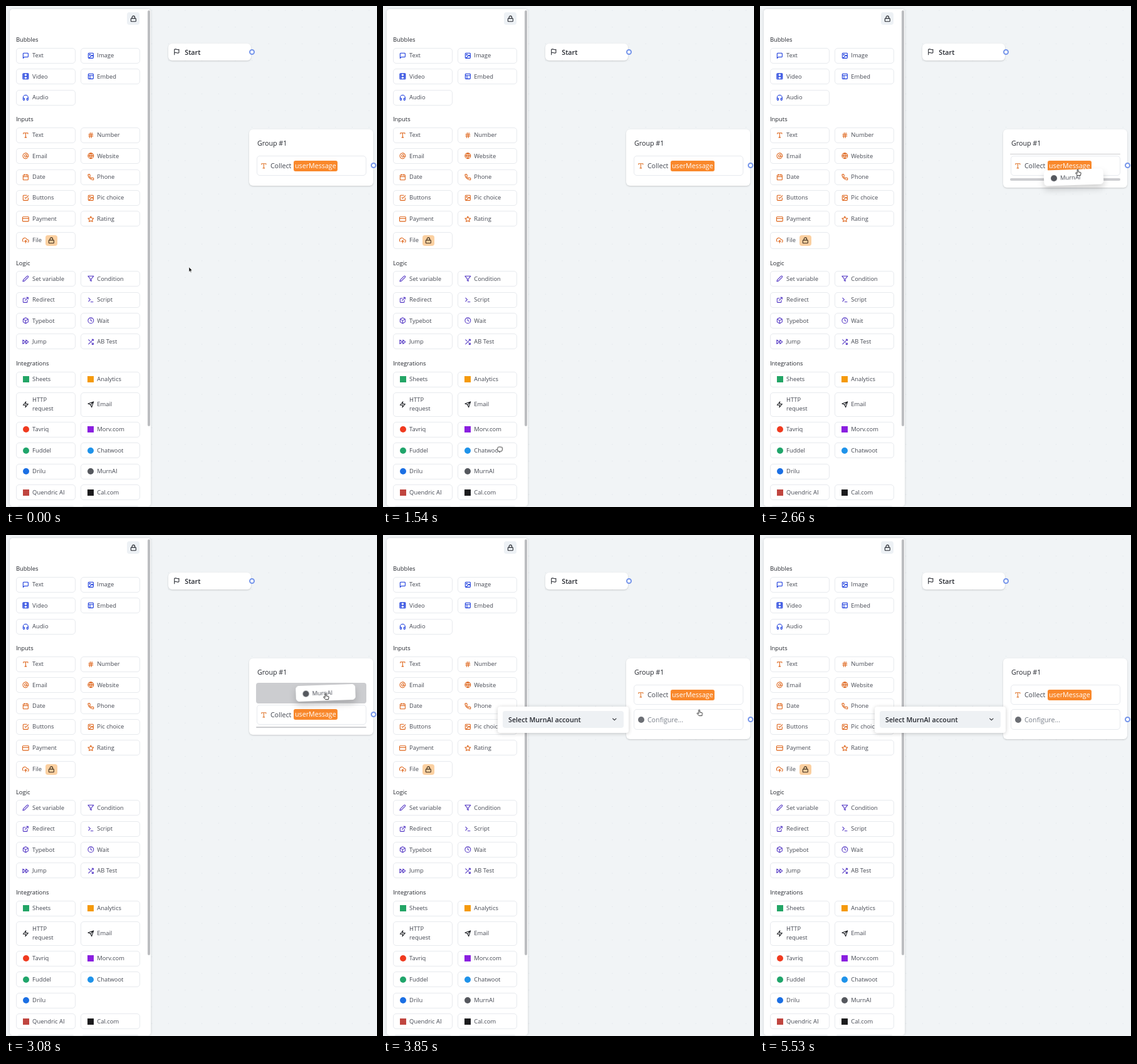
Recreate the animation shown at these times as an HTML page. Size 592 px wide and 800 px high, loop 5.88 s.

```html
<!DOCTYPE html>
<html lang="en">
<head>
<meta charset="utf-8">
<title>Flow editor</title>
<style>
* { box-sizing: border-box; }
html, body { margin: 0; width: 100%; height: 100%; overflow: hidden; }
body {
  position: relative;
  background: radial-gradient(#dde2e8 .7px, transparent 1px) 246px 47px / 26.67px 26.67px #f1f4f6;
  font: 9.4px/14px "Open Sans", sans-serif;
  color: #444852;
}
svg { display: block; width: 10.7px; height: 10.7px; flex: none; overflow: visible;
  fill: none; stroke: currentColor; stroke-width: 2.4; stroke-linecap: round; stroke-linejoin: round; }
.abs, .side, .card, .ghost, .pop, .cursor, .section, .port { position: absolute; }

.side { left: 6px; top: 5px; width: 225px; height: 794px; border-radius: 5px; background: #fff;
  overflow: hidden; }
.shade { left: 6px; top: 5px; width: 225px; height: 794px; border-radius: 5px; box-shadow: 0 0 4px #0002; }
.bar { left: 219.5px; top: 2px; width: 4.2px; height: 664px; border-radius: 2px; background: #bcbdc0; }
.lock { left: 187px; top: 5.3px; width: 20px; height: 20px; border-radius: 4px; background: #edf1f5;
  display: grid; place-items: center; color: #23262d; }
.section { left: 10px; }
.section h2 { height: 6px; margin: 0 0 13.5px; font: 500 9.4px/14px "Open Sans", sans-serif; color: #24272e; }
.grid { display: grid; grid-template-columns: 94.5px 94.5px; gap: 8.4px 8.7px; }
.btn { display: flex; align-items: center; gap: 5px; min-height: 25px; padding: 0 9.4px;
  border: 1px solid #e7eaee; border-radius: 5px; background: #fff; }
.btn.tall { min-height: 38.4px; padding-right: 20px; }
.btn.file { min-height: 27px; }
.badge { width: 19px; height: 17px; margin-left: 1px; border-radius: 4px; background: #fbd0a1; color: #3a2c1c;
  display: grid; place-items: center; }
.dot, .sq { flex: none; width: 10px; height: 10px; margin: 0 .35px; border-radius: 50%; }
.sq { border-radius: 0; }

.card { background: #fff; border-radius: 6px; box-shadow: 0 1px 3px #0000001f, 0 1px 2px #0000000f; color: #24272e; }
.start { left: 259px; top: 60px; width: 132px; height: 27px; padding-left: 8px; gap: 7.6px;
  display: flex; align-items: center; font-size: 10.7px; font-weight: 600; }
.port { width: 9px; height: 9px; border: 2px solid #7595ea; border-radius: 50%; background: #fff; }
.group { left: 388px; top: 197px; width: 198px; padding: 38.5px 11.5px 11px 10.5px; }
.group h3 { position: absolute; left: 13px; top: 15px; margin: 0; font: 500 10.7px/14px "Open Sans", sans-serif; }
.block { position: relative; display: flex; align-items: center; height: 32.5px; margin-left: 1px; padding-left: 5.7px;
  gap: 5px; border: 1px solid #e7eaee; border-radius: 5px; font-size: 10.7px; color: #444852; }
.block .port { left: 181.5px; top: 10.5px; }
.block mark { height: 17px; margin-left: -1.5px; padding: 0 2.2px; border-radius: 3px; line-height: 16.5px;
  background: #f9882b; color: #fff; }
.hole { height: 1.3px; border-radius: 4px; background: #cccdd0; }
.hole.top { margin-bottom: 2.2px; animation: topHole 5.88s infinite, dragging 5.88s step-end infinite; }
.hole.low { margin-top: 3.2px; animation: lowHole 5.88s infinite, dragging 5.88s step-end infinite; }
.added { animation: added 5.88s step-end infinite; }
.added .block { top: 2.5px; color: #7b818b; }
.first-port { animation: firstPort 5.88s step-end infinite; }

.pop { left: 183px; top: 274px; width: 208.5px; height: 41.5px; padding: 7px 7.5px; border-radius: 4px; background: #fff;
  box-shadow: 0 1px 6px #0003; animation: pop 5.88s infinite; }
.select { display: flex; align-items: center; justify-content: space-between; height: 27px; padding: 0 9.5px;
  border-radius: 4px; background: #eef1f4; color: #24272e; font-size: 10.7px; font-weight: 600; }

.slot { animation: slot 5.88s step-end infinite; }
.ghost { left: -47.5px; top: -12.5px; width: 95px; border-color: #fff; box-shadow: 0 6px 12px #0000002e;
  animation: ghost 5.88s infinite linear, drag 5.88s step-end infinite; }
.cursor { left: 0; top: 0; animation: move 5.88s linear infinite; }
.cursor svg { position: absolute; left: 0; top: 0; width: 1px; height: 1px; fill: #fff; stroke: #222; stroke-width: .9; }
.cursor .arrow { fill: #111; stroke: #fff; stroke-width: .5; animation: arrow 5.88s step-end infinite; }
.cursor .fist { animation: fist 5.88s step-end infinite; }
.cursor .hand { animation: hand 5.88s step-end infinite; }

@keyframes move {
  0% { transform: translate(292px, 417px); animation-timing-function: steps(14); }
  16.66% { transform: translate(254px, 566px); animation-timing-function: steps(10); }
  28.57%, 38.09% { transform: translate(170px, 743px); animation-timing-function: steps(6); }
  45.23% { transform: translate(508px, 266px); animation-timing-function: steps(6); }
  52.37%, 53.57% { transform: translate(511px, 258px); animation-timing-function: steps(4); }
  58.32%, 100% { transform: translate(505.5px, 284px); }
}
@keyframes ghost {
  0%, 38.09% { transform: translate(166px, 743px) rotate(-2deg); animation-timing-function: steps(6); }
  45.23% { transform: translate(500px, 273px) rotate(-2deg); animation-timing-function: steps(6); }
  52.37%, 53.57% { transform: translate(509.5px, 251.5px) rotate(-2deg); animation-timing-function: steps(4); }
  58.32%, 100% { transform: translate(503px, 286px) rotate(-2deg); }
}
@keyframes drag {
  0% { visibility: hidden; }
  38.09% { visibility: visible; }
  58.32%, 100% { visibility: hidden; }
}
@keyframes slot {
  0% { visibility: visible; box-shadow: none; }
  28.57% { visibility: visible; box-shadow: 0 2px 4px #0000002b; }
  38.09% { visibility: hidden; box-shadow: none; }
  58.32%, 100% { visibility: visible; box-shadow: none; }
}
@keyframes dragging {
  0% { visibility: hidden; }
  45.2% { visibility: visible; }
  58.32%, 100% { visibility: hidden; }
}
@keyframes topHole {
  0%, 47.6% { height: 1.3px; }
  51.1%, 54.7% { height: 33px; }
  58.3%, 100% { height: 1.3px; }
}
@keyframes lowHole {
  0%, 44.7% { height: 1.3px; animation-timing-function: linear; }
  45.23% { height: 4px; animation-timing-function: ease-out; }
  47.6% { height: 22px; }
  51.1%, 54.7% { height: 1.3px; }
  58.31% { height: 33px; }
  58.32%, 100% { height: 1.3px; }
}
@keyframes added {
  0% { visibility: hidden; height: 0; }
  58.32%, 100% { visibility: visible; height: 38.9px; }
}
@keyframes firstPort {
  0% { visibility: visible; }
  58.32%, 100% { visibility: hidden; }
}
@keyframes pop {
  0%, 58.32% { opacity: 0; transform: scale(.95); }
  61%, 100% { opacity: 1; transform: none; }
}
@keyframes arrow {
  0% { visibility: visible; }
  22.6%, 100% { visibility: hidden; }
}
@keyframes fist {
  0% { visibility: hidden; }
  22.6% { visibility: visible; }
  45.23%, 100% { visibility: hidden; }
}
@keyframes hand {
  0% { visibility: hidden; }
  45.23% { visibility: visible; }
  78.56%, 100% { visibility: hidden; }
}
</style>
</head>
<body>
<div class="card start"><i data-icon="flag"></i>Start</div>
<div class="port" style="left:388px;top:68.5px"></div>

<div class="card group">
  <h3>Group #1</h3>
  <div class="hole top"></div>
  <div class="block"><i data-icon="type" style="color:#e0762c"></i>Collect <mark>userMessage</mark><div class="port first-port"></div></div>
  <div class="hole low"></div>
  <div class="added"><div class="block"><i data-icon="dot:#6b6e74"></i>Configure...<div class="port"></div></div></div>
</div>

<div class="abs shade"></div>
<div class="side" id="side">
  <div class="abs lock"><i data-icon="lock"></i></div>
  <div class="abs bar"></div>
</div>

<div class="pop"><div class="select">Select MurnAI account<i data-icon="down"></i></div></div>
<div class="btn ghost"><i data-icon="dot:#55585e"></i>MurnAI</div>

<div class="cursor">
  <svg class="arrow"><path d="M0 0v7.5l1.7-1.6 1.1 2.6 1.1-.5-1.1-2.5h2.2z"/></svg>
  <svg class="fist"><path d="M-4-1.5q0-2 1.8-1.8.9-1 2 0 1.2-.8 2 .2 1.9-.4 1.9 1.6v1.8q0 3.4-2.9 3.4h-2.2q-2.8-.4-3.4-3.4z"/></svg>
  <svg class="hand"><path d="M-1.8 1v-5a.9.9 0 0 1 1.8 0v3l3.2.6q1 .3.9 1.4l-.6 3.6h-4.8l-2.9-3.4q-.5-1 .5-1z"/></svg>
</div>

<script>
const circle = (x, y, r) => `M${x - r} ${y}a${r} ${r} 0 1 0 ${2 * r} 0a${r} ${r} 0 1 0 ${-2 * r} 0z`;
const box = (x, y, w, h) =>
  `M${x + 2} ${y}h${w - 4}a2 2 0 0 1 2 2v${h - 4}a2 2 0 0 1-2 2h${4 - w}a2 2 0 0 1-2-2v${4 - h}a2 2 0 0 1 2-2z`;

const paths = {
  chat: 'M21 15a2 2 0 0 1-2 2H7l-4 4V5a2 2 0 0 1 2-2h14a2 2 0 0 1 2 2z',
  image: box(3, 3, 18, 18) + circle(8.5, 8.5, 1.5) + 'M21 15l-5-5L5 21',
  film: box(2, 2, 20, 20) + 'M7 2v20M17 2v20M2 12h20M2 7h5M2 17h5M17 17h5M17 7h5',
  layout: box(3, 3, 18, 18) + 'M3 9h18M9 21V9',
  audio: 'M3 18v-6a9 9 0 0 1 18 0v6M21 19a2 2 0 0 1-2 2h-1a2 2 0 0 1-2-2v-3a2 2 0 0 1 2-2h3zM3 19a2 2 0 0 0 2 2h1a2 2 0 0 0 2-2v-3a2 2 0 0 0-2-2H3z',
  type: 'M4 7V4h16v3M9 20h6M12 4v16',
  hash: 'M4 9h16M4 15h16M10 3L8 21M16 3l-2 18',
  at: circle(12, 12, 4) + 'M16 8v5a3 3 0 0 0 6 0v-1a10 10 0 1 0-3.9 7.9',
  globe: circle(12, 12, 10) + 'M2 12h20M12 2a15 15 0 0 1 4 10 15 15 0 0 1-4 10 15 15 0 0 1-4-10 15 15 0 0 1 4-10z',
  date: box(3, 4, 18, 18) + 'M16 2v4M8 2v4M3 10h18',
  phone: 'M22 17v3a2 2 0 0 1-2.2 2A20 20 0 0 1 2 4.2 2 2 0 0 1 4 2h3a2 2 0 0 1 2 1.7l.7 2.8a2 2 0 0 1-.5 2.1L8 9.9a16 16 0 0 0 6 6l1.3-1.3a2 2 0 0 1 2.1-.4l2.8.7A2 2 0 0 1 22 17z',
  check: 'M9 11l3 3L22 4M21 12v7a2 2 0 0 1-2 2H5a2 2 0 0 1-2-2V5a2 2 0 0 1 2-2h11',
  card: box(1, 4, 22, 16) + 'M1 10h22',
  star: 'M12 2l3.1 6.3 6.9 1-5 4.9 1.2 6.8-6.2-3.2L5.8 21 7 14.2 2 9.3l6.9-1z',
  upload: 'M16 16l-4-4-4 4M12 12v9M20.4 18.4A5 5 0 0 0 18 9h-1.3A8 8 0 1 0 3 16.3',
  lock: box(3, 11, 18, 11) + 'M7 11V7a5 5 0 0 1 10 0v4',
  pen: 'M17 3a2.8 2.8 0 1 1 4 4L7.5 20.5 2 22l1.5-5.5z',
  filter: 'M22 3H2l8 9.5V19l4 2v-8.5z',
  link: 'M18 13v6a2 2 0 0 1-2 2H5a2 2 0 0 1-2-2V8a2 2 0 0 1 2-2h6M15 3h6v6M10 14L21 3',
  shell: 'M4 17l6-6-6-6M12 19h8',
  cube: 'M21 16V8a2 2 0 0 0-1-1.7l-7-4a2 2 0 0 0-2 0l-7 4A2 2 0 0 0 3 8v8a2 2 0 0 0 1 1.7l7 4a2 2 0 0 0 2 0l7-4a2 2 0 0 0 1-1.7zM3.3 7L12 12l8.7-5M12 22V12',
  clock: circle(12, 12, 10) + 'M12 6v6l4 2',
  skip: 'M13 19l9-7-9-7zM2 19l9-7-9-7z',
  shuffle: 'M16 3h5v5M4 20L21 3M21 16v5h-5M15 15l6 6M4 4l5 5',
  zap: 'M13 2L3 14h9l-1 8 10-12h-9z',
  send: 'M22 2L11 13M22 2l-7 20-4-9-9-4z',
  flag: 'M4 15s1-1 4-1 5 2 8 2 4-1 4-1V3s-1 1-4 1-5-2-8-2-4 1-4 1zM4 22v-7',
  down: 'M6 9l6 6 6-6'
};

// "dot:#colour" and "sq:#colour" give plain shapes, other names give line icons
function icon(name, color = 'currentColor') {
  const [shape, fill] = name.split(':');
  return fill
    ? `<i class="${shape}" style="display:block;background:${fill}"></i>`
    : `<svg viewBox="0 0 24 24" style="color:${color}"><path d="${paths[name]}"/></svg>`;
}

// title, y of the heading's centre, icon colour, "icon|label|class"
const sections = [
  ['Bubbles', 54, '#1436dc', ['chat|Text', 'image|Image', 'film|Video', 'layout|Embed', 'audio|Audio']],
  ['Inputs', 181, '#dd6014', ['type|Text', 'hash|Number', 'at|Email', 'globe|Website', 'date|Date', 'phone|Phone',
    'check|Buttons', 'image|Pic choice', 'card|Payment', 'star|Rating', 'upload|File|file']],
  ['Logic', 410.5, '#5236c4', ['pen|Set variable', 'filter|Condition', 'link|Redirect', 'shell|Script',
    'cube|Typebot', 'clock|Wait', 'skip|Jump', 'shuffle|AB Test']],
  ['Integrations', 571, '#1c1e23', ['sq:#23a566|Sheets', 'sq:#f59a0b|Analytics', 'zap|HTTP request|tall', 'send|Email|tall',
    'dot:#f03a1f|Tavriq', 'sq:#8a1fe0|Morv.com', 'dot:#20a56b|Fuddel', 'dot:#1f93ea|Chatwoot',
    'dot:#1b6fe4|Drilu', 'dot:#55585e|MurnAI|slot', 'sq:#c0453f|Quendric AI', 'sq:#1b1b1d|Cal.com', '||', '||']]
];

const button = color => item => {
  const [name, label, kind = ''] = item.split('|');
  const badge = kind === 'file' ? `<span class="badge">${icon('lock')}</span>` : '';
  return `<div class="btn ${kind}">${name && icon(name, color)}${label}${badge}</div>`;
};

document.getElementById('side').insertAdjacentHTML('beforeend', sections.map(([title, y, color, items]) =>
  `<div class="section" style="top:${y - 11.7}px"><h2>${title}</h2>
   <div class="grid">${items.map(button(color)).join('')}</div></div>`).join(''));

for (const el of document.querySelectorAll('[data-icon]')) el.innerHTML = icon(el.dataset.icon);
</script>
</body>
</html>
```
